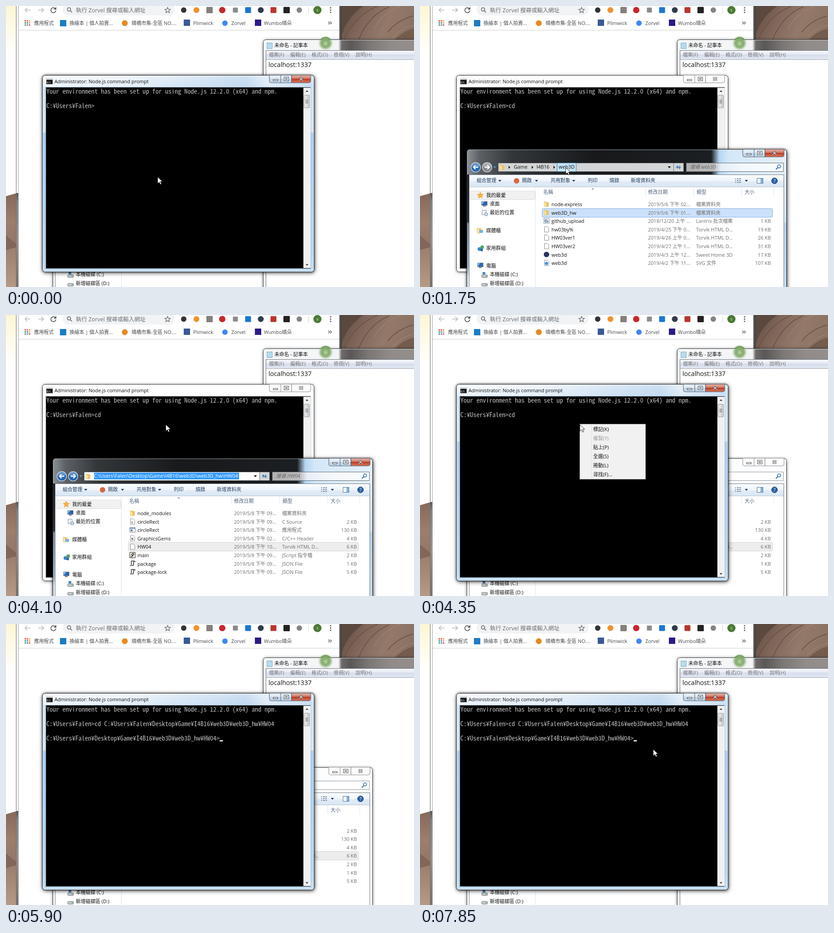
Recreate the animation shown at these times as an HTML page. Size 900 by 622 pixels, loop 8 s.

```html
<!DOCTYPE html>
<html lang="zh-Hant">
<head>
<meta charset="utf-8">
<title>Command prompt demo</title>
<style>
html, body { margin: 0; width: 900px; height: 622px; overflow: hidden; background: #fff; }
#stage { position: relative; width: 900px; height: 622px; overflow: hidden; }
svg { position: absolute; left: 0; top: 0; }
text { font: 10.8px "Open Sans", "Noto Sans CJK TC", "Noto Sans CJK", "Noto Sans", sans-serif; }
.con { font-family: "Noto Sans Mono CJK TC", "Noto Sans Mono CJK JP", "Liberation Mono", monospace; }
.big { font-size: 14.1px; }
.omni { font-size: 12.4px; }
.tiny { font-size: 7px; font-weight: 700; }
.it { font-style: italic; }
.deep { filter: drop-shadow(0 0 2px rgba(0,0,0,.6)) drop-shadow(1px 2px 4px rgba(0,0,0,.6)); }
.soft { filter: drop-shadow(0 1px 3px rgba(0,0,0,.5)); }
.blur { filter: blur(2px); }
#chrome { z-index: 0; }
#files { animation: filesZ 8s step-end infinite; }
#note { animation: noteZ 8s step-end infinite; }
#cmd { z-index: 4; }
#mouse { z-index: 9; animation: mouse 8s linear infinite; }
#fade { animation: fade 8s linear infinite; }
@keyframes filesZ { 0% { z-index: 1 } 13.125% { z-index: 5 } 52.5% { z-index: 3 } 76.875%, 100% { z-index: 1 } }
@keyframes noteZ { 0%, 52.5% { z-index: 2 } 76.875% { z-index: 6 } 91.25%, 100% { z-index: 2 } }
@keyframes fade { 0%, 60.62% { opacity: 0 } 60.625% { opacity: 1 } 63.75%, 100% { opacity: 0 } }
</style>
</head>
<body>
<div id="stage"></div>
<script>
const LOOP = 8000, CELL = 7.08, USER = 'Falen';

const text = (x, y, s, fill = '#111', extra = '') => `<text x="${x}" y="${y}" fill="${fill}" ${extra}>${s}</text>`;
const rect = (x, y, w, h, fill, extra = '') => `<rect x="${x}" y="${y}" width="${w}" height="${h}" fill="${fill}" ${extra}/>`;
const disc = (x, y, r, fill, extra = '') => `<circle cx="${x}" cy="${y}" r="${r}" fill="${fill}" ${extra}/>`;
const path = (d, fill = 'none', extra = '') => `<path d="${d}" fill="${fill}" ${extra}/>`;
const line = (d, color, w = 1, extra = '') => path(d, 'none', `stroke="${color}" stroke-width="${w}" ${extra}`);
const down = (x, y, c = '#1e395b') => path(`M${x - 3.5} ${y - 2}h7l-3.5 4z`, c);
const next = (x, y) => path(`M${x - 1.5} ${y - 3.5}v7l3.5-3.5z`, '#111');
const on = (ranges, body) => `<g data-on="${ranges}">${body}</g>`;
const layer = (id, body) => `<svg id="${id}" width="900" height="622">${body}</svg>`;
const edge = c => `stroke="${c}"`;

// stops: "offset color" pairs; spans run in stage pixels
function grad(id, [x1, y1, x2, y2], stops) {
  const list = stops.split(',').map(s => s.trim().split(' '));
  return `<linearGradient id="${id}" gradientUnits="userSpaceOnUse" x1="${x1}" y1="${y1}" x2="${x2}" y2="${y2}">` +
    list.map(([o, c]) => `<stop offset="${o}" stop-color="${c}"/>`).join('') + '</linearGradient>';
}
const ACTIVE_CMD = '0-1050 4200-6150 7300-8000', IDLE_CMD = '1050-4200 6150-7300';

function caption(x, y, active) {
  const rim = active ? '#4a5868' : '#8a8a8a', ink = active ? '#38424d' : '#4c4c4c';
  const fill = active ? '#c3d6e8' : '#fcfcfc';
  const id = 'red' + x;
  const cross = `M${x + 66} ${y + 5}l8 7m0-7l-8 7`;
  return grad(id, [0, y, 0, y + 17], '0 #e8b3a6,.45 #d17a66,.5 #bb3c22,1 #d8785c') +
    path(`M${x} ${y}h49v17h-45q-4 0-4-4z`, fill, edge(rim)) +
    path(`M${x + 49} ${y}h42v13q0 4-4 4h-38z`, active ? `url(#${id})` : fill, edge(rim)) +
    (active ? rect(x + 1, y + 1, 47, 7, '#fff', 'opacity=".55"') : '') +
    line(`M${x + 25} ${y}v17`, rim) +
    rect(x + 8.5, y + 9.5, 10, 3, '#fff', edge(ink)) +
    rect(x + 32.5, y + 4.5, 10, 8, '#fff', edge(ink)) + rect(x + 35.5, y + 7.5, 4, 2, '#fff', edge(ink)) +
    line(cross, ink, 3.2) + line(cross, '#fff', 1.3);
}
const frame = (x, y, w, h, fill, cls, shine = .7) =>
  rect(x + .5, y + .5, w, h, fill, `rx="6" stroke="#2f363d" class="${cls}"`) +
  rect(x + 1.5, y + 1.5, w - 2, h - 2, 'none', `rx="5" stroke="#fff" opacity="${shine}"`);

function browser() {
  const marks = [
    [62, '應用程式'], [140, '換繪本 | 個人拍賣...'], [277, '晴橋市集-全區 NO....'],
    [413, 'Plimwick'], [497, 'Zorvel'], [569, 'Wumbo晴朵']];
  const dots = ['#e04a3a', '#e04a3a', '#e8a33a', '#3c9a55', '#4a7fe0', '#e8a33a', '#3c9a55', '#4a7fe0', '#e04a3a'];
  const box = (x, c, s = 13) => rect(x - s / 2, 9 - s / 2, s, s, c, 'rx="1.5"');
  return grad('sky', [0, 0, 0, 110], '0 #fcf6d6,.5 #fefbea,1 #fff') +
    grad('fur', [741, 0, 900, 75], '0 #5f4a3f,.3 #80665a,.6 #93796a,1 #87705f') +
    grad('rock', [0, 416, 0, 622], '0 #86695b,.3 #9c7e6d,.5 #94786a,.6 #9d8070,1 #b59a87') +
    grad('side', [0, 413, 0, 622], '0 #4d5558,.1 #7f868a,.5 #9b918b,1 #77706c') +
    rect(0, 0, 28, 420, 'url(#sky)') +
    path('M0 421L28 413V622H0z', 'url(#rock)') +
    path('M0 508L22 526V534L0 540z', '#82665a') +
    rect(735, 0, 165, 110, 'url(#fur)') +
    path('M741 0H788Q752 26 741 62z', '#5b483e') +
    line('M820 0Q768 22 746 74M845 2Q800 20 778 74M898 22Q862 32 842 58', '#66503f', 1.5) +
    line('M870 0Q832 14 812 50M900 42Q868 50 850 74', '#a08674', 1.2) +
    path('M858 74Q878 54 900 50V74z', '#755d4e') +
    rect(735, 0, 6, 100, '#4a4644') + line('M736 0V80', '#a4a4a4') +
    rect(22, 0, 6, 622, '#f6f6f4') + rect(22, 414, 6, 208, 'url(#side)') +
    line('M22.5 0V622', '#6d6d6d') + line('M27.5 0V622', '#a9a9a9') +
    rect(28, 0, 707, 622, '#fff') + line('M28 53.5H735', '#cfcfcf') +
    line('M54 9H42m5-5l-5 5 5 5M71 9H83m-5-5l5 5-5 5', '#b9bcc0', 1.6) +
    line('M108.5 5.5A5.5 5.5 0 1 0 110 10', '#55595e', 1.8) + path('M111 2v6h-6z', '#55595e') +
    rect(125, -5, 247, 26, '#f1f3f4', 'rx="13"') +
    disc(139, 7.5, 3.7, 'none', 'stroke="#5f6368" stroke-width="1.5"') + line('M141.7 10.2l3.8 4', '#5f6368', 1.6) +
    text(154, 13.5, '執行 Zorvel 搜尋或輸入網址', '#6b6f74', 'class="omni"') +
    path('M356.5 3l1.7 4.2 4.5.3-3.5 2.9 1.1 4.4-3.8-2.4-3.8 2.4 1.1-4.4-3.5-2.9 4.5-.3z', 'none', 'stroke="#5f6368" stroke-width="1.2"') +
    disc(392, 9, 6, '#333') + disc(420, 9, 6.5, '#f0922e') + box(449, '#85807c', 14) + disc(477, 9, 7, '#c8262b') +
    box(506, '#8b8b8b', 11) + box(534, '#1a77d2') + disc(562, 9, 6.5, '#2f3a4c') + box(590, '#b8352c') +
    box(619, '#222', 14) + disc(647, 9, 6, '#838383') +
    line('M667.5 2V17', '#cfd2d6') + disc(687, 9, 9, '#4a7a33') + text(687, 12, 'S', '#fff', 'text-anchor="middle" style="font-size:8px"') +
    [4, 9, 14].map(y => disc(716, y, 1.6, '#555')).join('') +
    dots.map((c, i) => rect(41 + i % 3 * 4.7, 31.5 + Math.floor(i / 3) * 4.5, 3, 3, c)).join('') +
    rect(119, 31, 14, 14, '#1c7cc4') + disc(262, 38, 6.5, '#e58a1c') + rect(392, 30, 14, 14, '#3b5998') +
    disc(483, 38, 6, '#4285f4') + rect(549, 30, 14, 14, '#2c1a86') +
    marks.map(([x, s]) => text(x, 42, s, '#45484c')).join('') +
    line('M711 34.5l3 3-3 3m4-6l3 3-3 3', '#555', 1.3) +
    disc(705, 82, 13.5, '#5f8f45') + text(705, 86, 'S', '#dcebd0', 'text-anchor="middle" class="blur"');
}

function notepad() {
  const menu = [[580, '檔案(F)'], [627, '編輯(E)'], [674, '格式(O)'], [723, '檢視(V)'], [771, '說明(H)']];
  return grad('np', [567, 0, 900, 0], '0 #f6f7f8,.5 #f2f4f5,.52 #6d6a69,.58 #5a5756,.7 #7b7775,.85 #918c89,1 #938e8b') +
    grad('bar', [0, 98, 0, 118], '0 #f8f9fc,.45 #e6eaf4,.5 #d6dcec,1 #e2e7f2') +
    frame(567, 74, 360, 600, 'url(#np)', 'soft') +
    disc(705, 82, 13, '#86ad6f', 'class="blur"') + disc(705, 83, 4, '#bdd6ad', 'class="blur"') +
    on('6150-7300', rect(568, 75, 340, 23, '#b3d3f2', 'opacity=".45"') + rect(568, 98, 6, 530, '#b9d8f5')) +
    rect(576, 82, 11, 12, '#d8eefa', 'stroke="#4f8fb4"') + line('M578 85h7m-7 3h7m-7 3h7', '#6fb0d0') +
    text(592, 91, '未命名 - 記事本') +
    rect(573.5, 98.5, 330, 530, '#fff', 'stroke="#6c757d"') +
    rect(574, 99, 330, 19, 'url(#bar)') + line('M574 118.5H900', '#9aa0a8') +
    on('0-6150 7300-8000', menu.map(([x, s]) => text(x, 112, s, '#747474')).join('')) +
    on('6150-7300', menu.map(([x, s]) => text(x, 112, s)).join('')) +
    text(579, 135, 'localhost:1337', '#111', 'class="big"');
}

function icon(kind, x, y) {
  const page = path(`M${x - 4.5} ${y - 6}h6.5l3 3v9h-9.5z`, '#fff', 'stroke="#8c8c8c"');
  const kinds = {
    folder: () => path(`M${x - 5} ${y - 5.5}h4l1 1h5v10h-10z`, '#eac566') + path(`M${x - 5} ${y - 5.5}l5 3v9l-5-1.5z`, '#fbe6a4', 'stroke="#d6ab4c" stroke-width=".6"'),
    page: () => page,
    gear: () => rect(x - 6, y - 5.5, 12, 11, '#eef3f8', 'stroke="#8797a8"') + disc(x - 1, y, 2.5, 'none', 'stroke="#5b7590" stroke-width="1.5"') + disc(x + 3, y + 2, 1.5, '#7c93a8'),
    disc: () => disc(x, y, 6, '#2b315f'),
    web: () => page + disc(x, y + 1, 3.5, '#3a93d8'),
    c: () => page + text(x - 2.5, y + 4, 'c', '#444', 'class="tiny"'),
    h: () => page + text(x - 2.5, y + 4, 'h', '#222', 'class="tiny"'),
    exe: () => rect(x - 6, y - 5, 12, 10, '#fff', 'stroke="#777"') + rect(x - 6, y - 5, 12, 2.5, '#6d9ccb') + rect(x - 4, y - 1, 4, 4, '#46739f'),
    js: () => rect(x - 6, y - 6, 12, 12, '#f4efdc', 'stroke="#222"') + line(`M${x - 4} ${y + 3}q6 1 3-3t5-3m-6 7l5-6`, '#222', 1.4),
    json: () => line(`M${x - 5} ${y + 4.5}h5q2.5 0 2.5-3v-6.5h3v2M${x - 2.5} ${y + 3}v-8.5h6`, '#333', 1.5)
  };
  return kinds[kind]();
}
const rowY = i => 439 + 18.6 * i;
const pick = (i, fill, rim) => rect(269.5, Math.round(rowY(i)) - 9.5, 508, 19, fill, `rx="2" stroke="${rim}"`);

function rows(list) {
  return list.map(([kind, name, date, type, size], i) => {
    const y = rowY(i) + 4;
    return icon(kind, 279, rowY(i) - .5) + text(290, y, name) + text(503, y, date + '...', '#6d6d6d') +
      text(609, y, type, '#6d6d6d') + (size ? text(774, y, size + ' KB', '#6d6d6d', 'text-anchor="end"') : '');
  }).join('');
}
const HTML_TYPE = 'Torvik HTML D...';
const EVE = '2019/5/8 下午 09';
const WEB3D = [
  ['folder', 'node-express', '2019/5/6 下午 02', '檔案資料夾'],
  ['folder', 'web3D_hw', '2019/5/6 下午 01', '檔案資料夾'],
  ['gear', 'github_upload', '2018/12/20 上午 ', 'Lantrix 批次檔案', 1],
  ['page', 'hw03by%', '2019/4/25 下午 0', HTML_TYPE, 19],
  ['page', 'HW03ver1', '2019/4/26 上午 0', HTML_TYPE, 26],
  ['page', 'HW03ver2', '2019/4/27 上午 1', HTML_TYPE, 31],
  ['disc', 'web3d', '2019/4/3 上午 12', 'Sweet Home 3D', 17],
  ['web', 'web3d', '2019/4/2 下午 11', 'SVG 文件', 107]];
const HW04 = [
  ['folder', 'node_modules', EVE, '檔案資料夾'],
  ['c', 'circleRect', EVE, 'C Source', 2],
  ['exe', 'circleRect', EVE, '應用程式', 130],
  ['h', 'GraphicsGems', '2019/5/6 下午 02', 'C/C++ Header', 4],
  ['page', 'HW04', '2019/5/8 下午 10', HTML_TYPE, 6],
  ['js', 'main', EVE, 'JScript 指令檔', 2],
  ['json', 'package', EVE, 'JSON File', 1],
  ['json', 'package-lock', EVE, 'JSON File', 5]];

function tools(items) {
  return items.map(([x, s, arrow]) => text(x, 390, s, '#1e395b') + (arrow ? down(arrow, 387) : '')).join('');
}
const round = (x, flip, fill) => disc(x, 357, 10.5, fill, 'stroke="#dfe6ee" stroke-width="1.2"') +
  path(`M${x - 9} 355a9 9 0 0 1 18 0q-9 3-18 0z`, '#fff', 'opacity=".3"') +
  line(`M${x + 5.5 * flip} 357H${x - 5 * flip}m${4.5 * flip}-4.5l${-4.5 * flip} 4.5 ${4.5 * flip} 4.5`, '#fff', 2.4);

function explorer() {
  const nav = [
    [146, 423, '我的最愛'], [154, 442, '桌面'], [154, 461, '最近的位置'], [146, 501, '媒體櫃'],
    [146, 540, '家用群組'], [146, 579, '電腦'], [154, 598, '本機磁碟 (C:)'], [154, 618, '新增磁碟區 (D:)']];
  const heads = [[272, '名稱'], [503, '修改日期'], [610, '類型'], [716, '大小']];
  const drive = y => rect(136, y, 13, 6, '#c3c8cc', 'rx="2" stroke="#6e767d"') + rect(145, y + 2, 2, 2, '#4fb052');
  const screen = (x, y) => rect(x - 6, y - 5, 12, 8, '#2a67b5', 'stroke="#3d4a58"') + path(`M${x - 6} ${y + 3}l6-8h-6z`, '#7fb6ea') + rect(x - 3, y + 4, 6, 2, '#777');
  const crumbs = (list) => list.map(([x, s, arrow]) => text(x, 360, s) + (arrow ? next(arrow, 357) : '')).join('');
  const base = [[207, 'Game', 248], [257, 'I4B16', 296]];
  const hw = '0-1600 2650-8000', web = '1600-2650';
  return grad('glass', [103, 0, 808, 0], '0 #8d9297,.04 #5d6165,.14 #33373a,.4 #17191b,.765 #1c1f22,.79 #b4d6f2,.82 #d4e8f9,1 #e4eff9') +
    grad('gl', [0, 373, 0, 600], '0 #1c1f22,.46 #2b3035,.48 #7d8f9f,.9 #9fb0bf,1 #dfeaf4') +
    grad('gr', [0, 373, 0, 600], '0 #e4eff9,.46 #d3e6f7,.48 #b4d6f2,1 #c4dff5') +
    grad('tb', [0, 374, 0, 401], '0 #fbfdff,.5 #eef4fb,.52 #e2ecf7,1 #dae6f3') +
    grad('find', [587, 0, 802, 0], '0 #b0b0b0,.28 #bababb,.36 #e6eff7,.6 #f4f8fc,1 #fafcfe') +
    grad('sel', [0, 0, 0, 622], '0 #d3e6fc,1 #c9e0fb') +
    on('0-1050 4200-8000', frame(103, 317, 705, 340, '#fcfdfe', 'soft') + caption(712, 317, false)) +
    on('1050-4200', frame(103, 317, 705, 340, 'url(#glass)', 'deep', .4) +
      rect(104, 373, 5, 250, 'url(#gl)') + rect(802, 373, 6, 250, 'url(#gr)') + caption(712, 317, true)) +
    round(123, 1, '#2468b4') + on('0-2650', round(148, -1, '#84898e')) + on('2650-8000', round(148, -1, '#2468b4')) +
    down(165, 357, '#5a8fc4') +
    rect(172.5, 347.5, 409, 19, '#d3d5d6', 'stroke="#4f565d"') +
    on('0-1050 3450-8000', rect(173, 348, 387, 18, '#fff')) +
    line('M559.5 348V366', '#6d757d') + icon('folder', 181, 357) + down(550, 357, '#111') +
    line('M565 358l2.5-4 2.5 4m-2.5-3v5M570 356l2.5 4 2.5-4m-2.5 3v-6', '#2f72b3', 1.3) +
    on('0-3450 4200-8000', next(197, 357) + on('1500-2200', rect(302.5, 347.5, 42, 19, '#c4e3f8', 'stroke="#3c7fb1"')) +
      crumbs(base) + text(306, 360, 'web3D') +
      on(hw, next(351, 357) + crumbs([[362, 'web3D_hw', 427], [436, 'HW04']]))) +
    on('3450-4200', rect(194, 349, 320, 15, '#3399ff') + text(194, 360, `C:\\Users\\${USER}\\Desktop\\Game\\I4B16\\web3D\\web3D_hw\\HW04`, '#fff')) +
    on('1050-4200', rect(587.5, 347.5, 214, 19, 'url(#find)', 'stroke="#5d646b"')) +
    on('0-1050 4200-8000', rect(587.5, 347.5, 214, 19, '#fff', 'stroke="#8d949b"')) +
    on(hw, text(596, 360, '搜尋 HW04', '#666', 'class="it"')) + on(web, text(596, 360, '搜尋 web3D', '#666', 'class="it"')) +
    disc(792, 355, 3.5, 'none', 'stroke="#2f6fb0" stroke-width="1.6"') + line('M789.5 357.5l-4.5 4.5', '#2f6fb0', 2) +
    rect(108.5, 373.5, 694, 260, '#fff', 'stroke="#6f7881"') +
    rect(109, 374, 693, 27, 'url(#tb)') + line('M109 400.5H802', '#b4c3d4') +
    tools([[125, '組合管理', 176], [225, '開啟']]) +
    on('0-1800 3050-8000', disc(213, 387, 6, '#d9673d') + down(257, 387) +
      tools([[288, '共用對象', 339], [370, '列印'], [418, '燒錄'], [465, '新增資料夾']])) +
    on('1800-3050', icon('folder', 213, 387) + tools([[273, '加入至媒體櫃', 344], [375, '共用對象', 426], [457, '燒錄'], [505, '新增資料夾']])) +
    [382, 386, 390].map(y => line(`M695 ${y + .5}h2m2 0h4m1 0h4`, '#56718f', 1.5)).join('') + down(720, 387) +
    rect(743.5, 381.5, 13, 11, '#fff', 'stroke="#4c7297"') + rect(751, 382, 5, 10, '#86b5df') +
    disc(782, 387, 6.5, '#2c62a8', 'stroke="#1c3f6c"') + text(782, 391, '?', '#fff', 'text-anchor="middle" font-weight="700"') +
    rect(110.5, 409.5, 143, 19, '#f1f1f1', 'stroke="#dcdcdc" rx="2"') + line('M254.5 402V622', '#dce6f1') +
    path('M133 412l2 4.5 5 .5-3.7 3.3 1 5-4.3-2.6-4.3 2.6 1-5-3.7-3.3 5-.5z', '#f5b23c', 'stroke="#d98d1f" stroke-width=".6"') +
    screen(142, 438) + rect(137, 452, 9, 10, '#eef2f5', 'stroke="#8796a5"') + disc(146, 461, 3.5, '#c9dced', 'stroke="#6d8296"') +
    icon('folder', 131, 497) + rect(131, 496, 8, 6, '#6fb2e4') +
    disc(131, 538, 4, '#3b86c8') + disc(137, 534, 4, '#4fa36a') + disc(136, 540, 3, '#2d68a5') + screen(133, 574) +
    drive(595) + rect(138, 589, 6, 5, '#3f83c6') + drive(614) +
    nav.map(([x, y, s]) => text(x, y, s)).join('') +
    heads.map(([x, s]) => text(x, 416, s, '#4c607a')).join('') +
    [497, 603, 709, 780].map(x => line(`M${x}.5 402V421`, '#dfe7f1')).join('') +
    path('M378 406h6l-3-3z', '#7392ae') +
    on('0-1600 2650-3450', pick(4, 'url(#sel)', '#84acdd')) + on('3450-8000', pick(4, '#ededed', '#d6d6d6')) +
    on(web, pick(1, 'url(#sel)', '#84acdd') + rows(WEB3D)) + on(hw, rows(HW04));
}

function consoleWindow() {
  const cell = col => 89 + col * CELL;
  const say = (col, y, s) => text(cell(col), y, s, '#c0c0c0', 'class="con"');
  const caret = (when, col, y) => on(when, rect(cell(col), y, 7, 3, '#dcdcdc'));
  const home = `C:¥Users¥${USER}`, dir = home + '¥Desktop¥Game¥I4B16¥web3D¥web3D_hw¥HW04';
  const menu = ['標記(K)', '複製(Y)', '貼上(P)', '全選(S)', '捲動(L)', '尋找(F)...'];
  return grad('aero', [0, 153, 0, 588], '0 #f3f7fb,.03 #dbe9f6,.06 #cfe3f6,.29 #d3e6f6,.295 #a9cff1,.9 #b5d8f6,1 #c4e0f6') +
    grad('shine', [80, 0, 679, 0], '0 #fff,.3 #f4f8fc,.75 #b9d4ee,.83 #eaf2f9,1 #c2dcf4') +
    on(IDLE_CMD, frame(80, 153, 599, 435, '#fdfdfd', 'soft') + caption(581, 153, false)) +
    on(ACTIVE_CMD, frame(80, 153, 599, 435, 'url(#aero)', 'deep') +
      rect(83, 155, 593, 24, 'url(#shine)', 'opacity=".6"') + caption(581, 153, true)) +
    rect(89, 161, 14, 12, '#111', 'stroke="#999" stroke-width=".7"') + rect(89, 161, 14, 2.5, '#d4d4d4') +
    text(90, 171, 'C:\\', '#fff', 'class="tiny" style="font-size:6px"') +
    text(107, 171, 'Administrator: Node.js command prompt') +
    rect(88, 180, 584, 401, '#000', 'stroke="#7f8a94" stroke-width=".6"') +
    rect(656, 181, 16, 399, '#f1f1f1') + path('M661 190h6l-3-3.5z', '#333') + path('M661 571.5h6l-3 3.5z', '#333') +
    rect(657.5, 197.5, 12, 28, '#e2e3e5', 'rx="1.5" stroke="#9a9da1"') + rect(664, 198, 5, 27, '#cfd1d4') +
    line('M660.5 208.5h6m-6 3h6m-6 3h6', '#555') +
    say(0, 194, 'Your environment has been set up for using Node.js 12.2.0 (x64) and npm.') +
    say(0, 226, home + '&gt;') + on('300-8000', say(15, 226, 'c')) + on('450-8000', say(16, 226, 'd')) +
    on('4850-8000', say(18, 226, dir)) + on('5250-8000', say(0, 258, dir + '&gt;')) +
    caret('550-800 4200-4350', 18, 225) + caret('4900-5250', 71, 225) + caret('5250-6150 7300-8000', 54, 257) +
    on('4350-4850', rect(352.5, 241.5, 145, 122, '#f1f1f1', 'stroke="#979797"') + line('M378.5 243V362', '#dcdcdc') +
      on('4550-4850', rect(354.5, 283.5, 141, 19, '#dbe8f6', 'rx="2" stroke="#a9cbee"')) +
      menu.map((s, i) => text(382, 257 + i * 20, s, i == 1 ? '#999' : '#111')).join('')) +
    `<g id="fade">${rect(354, 283, 142, 20, '#bdbbc5', 'stroke="#8f9bb3"')}${text(382, 297, '貼上(P)')}</g>`;
}

document.getElementById('stage').innerHTML =
  layer('chrome', browser()) + layer('files', explorer()) + layer('note', notepad()) + layer('cmd', consoleWindow()) +
  `<svg id="mouse" width="14" height="20">${path('M.5 .5V15l3.5-3.3 2.4 5.3 2.5-1.1-2.4-5.1h4.7z', '#fff', 'stroke="#111" stroke-width=".9"')}</svg>`;

// time in ms, then the pointer tip
const TRACK = [
  [0, 334, 378], [300, 334, 378], [800, 361, 580], [1040, 361, 580], [1050, 361, 556], [1300, 361, 556],
  [1550, 321, 357], [2150, 321, 357], [2450, 122, 352], [2700, 122, 352], [2950, 154, 359], [3000, 154, 359],
  [3350, 500, 352], [3850, 500, 352], [4100, 352, 242], [4350, 352, 242], [4600, 406, 296], [5400, 406, 296],
  [5450, 426, 298], [5600, 426, 298], [5900, 905, 118], [6450, 905, 125], [7050, 404, 264], [7250, 443, 262],
  [7450, 443, 262], [7850, 514, 277], [8000, 514, 277]];
const pct = ms => ms / LOOP * 100 + '%';
let css = `@keyframes mouse {${TRACK.map(([t, x, y]) => `${pct(t)} { transform: translate(${x}px, ${y}px) }`).join('')}}`;

// data-on="from-to ..." shows a part only in those spans
const seen = new Map();
for (const el of document.querySelectorAll('[data-on]')) {
  const key = el.dataset.on;
  if (!seen.has(key)) {
    const name = 'on' + seen.size;
    seen.set(key, name);
    const steps = key.split(' ').map(r => r.split('-').map(Number))
      .map(([a, b]) => `${pct(a)} { opacity: 1 }` + (b < LOOP ? `${pct(b)} { opacity: 0 }` : ''));
    css += `@keyframes ${name} { 0% { opacity: 0 } ${steps.join(' ')} }`;
  }
  el.style.animation = `${seen.get(key)} ${LOOP}ms step-end infinite`;
}

// size the console font so that one character fills one cell
const pen = document.createElement('canvas').getContext('2d');
pen.font = '100px ' + getComputedStyle(document.querySelector('.con')).fontFamily;
css += `.con { font-size: ${CELL * 100 / pen.measureText('M').width}px }`;
document.head.appendChild(document.createElement('style')).textContent = css;
</script>
</body>
</html>
```
